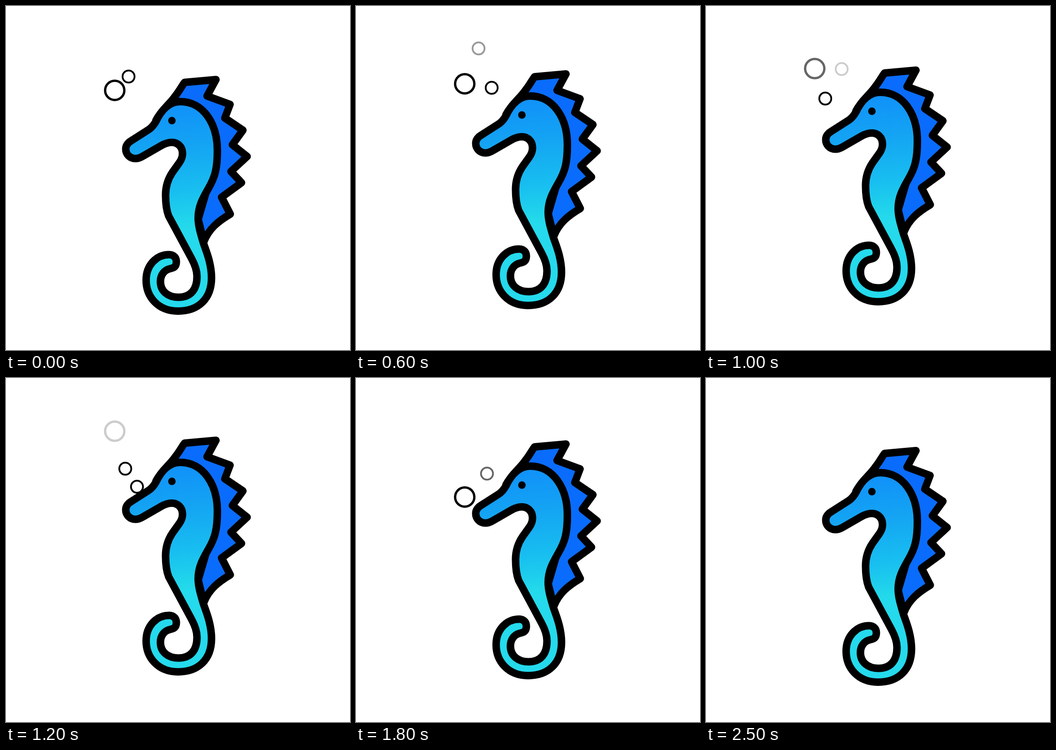
Write an HTML page that moves like this. It is 734x734 px and loops after 2.6 s.

```html
<!DOCTYPE html>
<html lang="en">
<head>
<meta charset="utf-8">
<title>Seahorse</title>
<style>
html, body { margin: 0; width: 100%; height: 100%; overflow: hidden; background: #fff; }
svg { display: block; width: 100vw; height: 100vh; }
</style>
</head>
<body>
<svg viewBox="0 0 734 734" fill="none" stroke="#000" stroke-linejoin="round" stroke-linecap="round">
  <defs>
    <linearGradient id="skin" gradientUnits="userSpaceOnUse" x1="345" y1="205" x2="368" y2="480">
      <stop offset="0" stop-color="#1090fa"/>
      <stop offset=".35" stop-color="#14a4f3"/>
      <stop offset=".7" stop-color="#18bff0"/>
      <stop offset=".95" stop-color="#22d8ea"/>
      <stop offset="1" stop-color="#24daec"/>
    </linearGradient>
  </defs>
  <g id="horse" stroke-width="16">
    <!-- The fin closes behind the body. -->
    <path fill="#0a6cfc" d="M320 244C332 221 350 209 362 191
      C370 181 375 171 381 163L448 157L429 192L478 210L467 239L505.5 265
      L483 296L514.5 321L480 353L502.5 377L460 408L478.5 444
      C453 459 433 475 422 503L410 455L432 380L442 300L415 235L372 214Z"/>
    <path fill="url(#skin)" d="M268 287L304 264C312 259 316 253 320 246
      C331 223 348 204 372 204C420 204 451 250 451 308
      C451 347 446 365 432 389C420 410 410 427 410 452
      C410 470 416 488 421 505C425 518 438.5 547 438.5 580
      C438.5 625 410 651 367 651C325 651 299 621 299 585
      C299 552 322 530.5 348 530.5C358 530.5 363.5 537 363.5 546
      C363.5 557 357 559 350 560.5C338 563 329.5 574 329.5 588
      C329.5 608 345 621.5 368 621.5C396 621.5 407.5 603 407.5 577
      C407.5 564 402 550 396 539L347 448
      C342 435 340.5 420 340.5 403C340.5 382 347 367 355 355
      L370 334C375 327 377 320 376.5 313C376 300 366 291 354 291
      C345 291 338 294 331 298L291 321C285 324.5 280 325.5 276 325.5
      C264 325.5 255.5 316 255.5 305C255.5 297 261 291 268 287Z"/>
    <circle cx="354" cy="244.5" r="8" fill="#000" stroke="none"/>
  </g>
  <g id="bubbles"></g>
</svg>
<script>
const STEP = 100, STEPS = 26;
const horse = document.getElementById('horse');
const layer = document.getElementById('bubbles');

// All times are in steps; a bubble drifts slowly, then rises fast and fades over five steps.
const bubbles = [
  { x: 232,   y: 180,   big: true,  born: 0,  rise: 7,  fade: 8, drift: 2.35 },
  { x: 261.5, y: 150.5, big: false, born: 0,  rise: 0,  fade: 3 },
  { x: 289.5, y: 198.5, big: false, born: 2,  rise: 4,  fade: 6 },
  { x: 254.5, y: 197.5, big: false, born: 10, rise: 12, fade: 13 },
  { x: 279.5, y: 234,   big: false, born: 11, rise: 16, fade: 16 },
  { x: 232,   y: 262,   big: true,  born: 14, rise: 19, fade: 19 }
];

for (const b of bubbles) {
  b.node = document.createElementNS('http://www.w3.org/2000/svg', 'circle');
  b.node.setAttribute('cx', b.x);
  b.node.setAttribute('r', b.big ? 20.5 : 12.8);
  b.node.setAttribute('stroke-width', b.big ? 5 : 3.8);
  layer.append(b.node);
}

function lift(n) {
  if (n <= 12) return -2 * n;
  if (n <= 18) return -24 + (n - 12) * 4 / 3;
  return 2 * (n - STEPS);
}

function draw(now) {
  const n = Math.floor(now / STEP) % STEPS;
  horse.setAttribute('transform', `translate(0 ${lift(n)})`);
  for (const b of bubbles) {
    const slow = Math.min(n, b.rise) - b.born;
    const fast = Math.max(0, n - b.rise);
    const alpha = n < b.born ? 0 : Math.max(0, Math.min(1, 1 - (n - b.fade) / 5));
    b.node.setAttribute('cy', b.y - slow * (b.drift || 2) - fast * 10);
    b.node.setAttribute('opacity', alpha);
  }
}

const start = performance.now();
function tick() {
  draw(performance.now() - start);
  requestAnimationFrame(tick);
}
tick();
</script>
</body>
</html>
```
